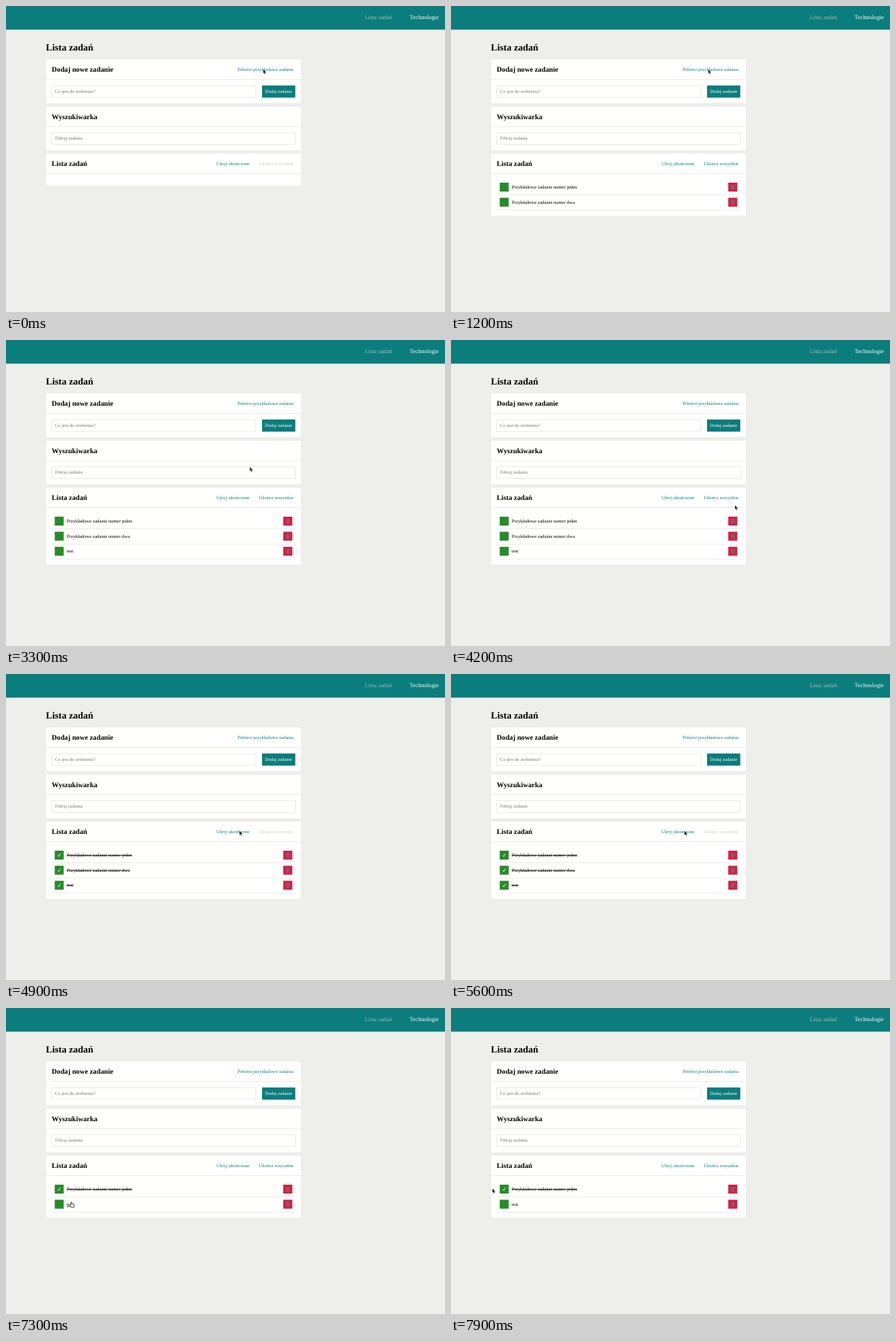
Animation of 600x419 px, one loop 8 s. Source, as an HTML page:

```html
<!DOCTYPE html>
<html lang="pl">
<head>
<meta charset="utf-8">
<title>Lista zadań</title>
<style>
  html, body { margin: 0; width: 100%; height: 100%; overflow: hidden; background: #eeeeea; }
  svg { display: block; width: 600px; height: 419px; }
  text { font: 6.5px "Liberation Serif", "Times New Roman", serif; text-rendering: geometricPrecision; white-space: pre; }
  .h1 { font-size: 13px; font-weight: bold; }
  .h2 { font-size: 9.75px; font-weight: bold; }
  .nav { font-size: 8.125px; }
  .done { text-decoration: line-through; }
  .hover { text-decoration: underline; }
  .done.hover { text-decoration: underline line-through; }
</style>
</head>
<body>
<svg id="stage" viewBox="0 0 600 419"></svg>
<script>
const LOOP = 8000, STEP = 100;
const TEAL = '#0b7d7c', GREY = '#757575', OFF = '#cccccc';
const stage = document.getElementById('stage');

// Pointer path: time, x, y
const path = [
  [0, 351.5, 86.5], [1400, 351.5, 86.5], [1900, 278.5, 121.5], [2900, 278.5, 121.5],
  [3700, 388, 226], [4200, 388, 226], [4400, 372, 214.5], [4600, 372, 214.5],
  [4900, 319, 214.5], [5600, 319, 214.5], [5900, 385, 268], [6100, 385, 268],
  [6300, 73, 268], [6400, 73, 268], [6600, 119.5, 249], [6800, 119.5, 249],
  [7100, 100, 256], [7300, 88.5, 265.5], [7500, 88.5, 265.5], [7700, 60, 240], [7900, 56.5, 247]
];

const during = (t, from, to) => t >= from && t < to;

function pointerAt(t) {
  const i = path.findIndex(p => p[0] > t);
  if (i < 0) return path.at(-1).slice(1);
  const [t0, x0, y0] = path[i - 1], [t1, x1, y1] = path[i];
  const u = (t - t0) / (t1 - t0), k = u * u * (3 - 2 * u);
  return [x0 + (x1 - x0) * k, y0 + (y1 - y0) * k];
}

const rect = (x, y, w, h, fill, extra = '') =>
  `<rect x="${x}" y="${y}" width="${w}" height="${h}" fill="${fill}" ${extra}/>`;
const text = (x, y, s, fill = '#000', cls = '', extra = '') =>
  `<text x="${x}" y="${y}" fill="${fill}" class="${cls}" ${extra}>${s}</text>`;
const link = (right, y, s, fill = TEAL) => text(right, y, s, fill, '', 'text-anchor="end"');

const card = (y, h, title) =>
  rect(54.1, y - .4, 349.8, h + .9, '#e1e1de') + rect(54.6, y, 348.8, h, '#fffffe') +
  rect(54.6, y + 27.2, 348.8, .6, '#dededc') + text(62.5, y + 16.9, title, '#000', 'h2');

function input(y, w, hint, value, focus) {
  const frame = focus ? 'stroke="#101820" stroke-width="1.3" rx="1"' : 'stroke="#dddddb" stroke-width=".6"';
  return rect(62.7, y, w, 16, '#fffffe', frame) + text(67, y + 9.8, value || hint, value ? '#000' : GREY) +
    (focus ? rect(67 + value.length * 2.35, y + 4.2, .5, 7.2, '#000') : '');
}

const bin = (x, y) => `<g transform="translate(${x} ${y})" fill="none" stroke="#7f6b79" stroke-width=".7">
  <path d="M-3-2.6H3M-2.5-2.4-1.8 3H1.8L2.5-2.4M-.8-2.2-.6 2.8M.8-2.2.6 2.8M-2.2-.8H2.2M-2 1H2"/></g>`;

function row({ name, done, hover }, i) {
  const y = 248 + i * 20.65;
  return rect(66.6, y - 6.1, 12.2, 12.2, '#268b29') +
    (done ? `<path d="M70.9 ${y + .2}l1.2 1.8 2.4-4.1" fill="none" stroke="#fff" stroke-width=".8"/>` : '') +
    text(83, y + 2, name, '#000', (done ? 'done ' : '') + (hover ? 'hover' : '')) +
    rect(379, y - 6.1, 12.3, 12.2, '#d41f43') + bin(385.2, y) +
    rect(62.5, y + 10.4, 333, .6, '#dededc');
}

function tasksAt(t) {
  const allDone = t >= 4500;
  const list = [];
  if (t >= 1100) list.push({ name: 'Przykładowe zadanie numer jeden', done: allDone, hover: during(t, 6500, 7200) });
  if (during(t, 1100, 6100)) list.push({ name: 'Przykładowe zadanie numer dwa', done: allDone });
  if (t >= 2700) list.push({ name: 'test', done: during(t, 4500, 6400), hover: during(t, 7200, 7700) });
  return list;
}

function listPage(t) {
  const tasks = tasksAt(t), hidden = during(t, 5100, 5500);
  const rows = hidden ? [] : tasks;
  const typed = t < 2700 ? 'test'.slice(0, Math.max(0, (t - 2000) / STEP)) : '';
  const open = tasks.some(task => !task.done);
  return text(54.5, 61, 'Lista zadań', '#000', 'h1') +
    card(73, 60.3, 'Dodaj nowe zadanie') + link(393, 88.5, 'Pobierz przykładowe zadania') +
    input(109.1, 278.7, 'Co jest do zrobienia?', typed, during(t, 2000, 3100)) +
    rect(350, 108.8, 45.4, 16.7, TEAL) + text(353.9, 118.9, 'Dodaj zadanie', '#fff') +
    card(137.6, 60.3, 'Wyszukiwarka') + input(173.6, 332.6, 'Filtruj zadania', '', false) +
    card(202.2, 44 + rows.length * 20.65, 'Lista zadań') +
    link(332.7, 217.7, hidden ? 'Pokaż ukończone' : 'Ukryj ukończone') +
    link(393, 217.7, 'Ukończ wszystkie', open ? TEAL : OFF) +
    rows.map(row).join('');
}

const taskPage = ({ name, done }) =>
  text(54.5, 61, 'Szczegóły zadania', '#000', 'h1') + card(73, 52, name) +
  text(62.5, 115, `<tspan font-weight="bold">Ukończone:</tspan> ${done ? 'Tak' : 'Nie'}`);

function pointer(t) {
  const [x, y] = pointerAt(t);
  let shape;
  if (during(t, 1800, 3000))
    shape = '<path d="M-1.3-2.8H1.3M0-2.8V2.8M-1.3 2.8H1.3" fill="none" stroke="#222" stroke-width=".7"/>';
  else if (during(t, 7200, 7500))
    shape = '<path d="M.2.4Q.8-.2 1.3.5V2.5L4.4 3.1Q5 3.4 4.8 4.5L4.2 7.7H1.2L-.7 5.2Q-.9 4.2.2 4.5Z" fill="#fff" stroke="#111" stroke-width=".7"/>';
  else
    shape = '<path d="M0 0V6.1L1.4 4.9 2.4 7.3 3.5 6.8 2.5 4.5H4.3Z" fill="#111" stroke="#fff" stroke-width=".35"/>';
  return `<g transform="translate(${x} ${y})">${shape}</g>`;
}

function draw(t) {
  const tasks = tasksAt(t);
  const opened = during(t, 6800, 7100) ? tasks[0] : during(t, 7400, 7700) ? tasks[1] : null;
  stage.innerHTML = rect(0, 0, 600, 419, '#eeeeea') + rect(0, 0, 600, 32.4, TEAL) +
    text(490.4, 18.3, 'Lista zadań', '#a9b9b6', 'nav') + text(551.6, 18.3, 'Technologie', '#fff', 'nav') +
    (opened ? taskPage(opened) : listPage(t)) + pointer(t);
}

let last = -1;
function tick() {
  const t = Math.floor(performance.now() % LOOP / STEP) * STEP;
  if (t !== last) draw(last = t);
  requestAnimationFrame(tick);
}
tick();
</script>
</body>
</html>
```
